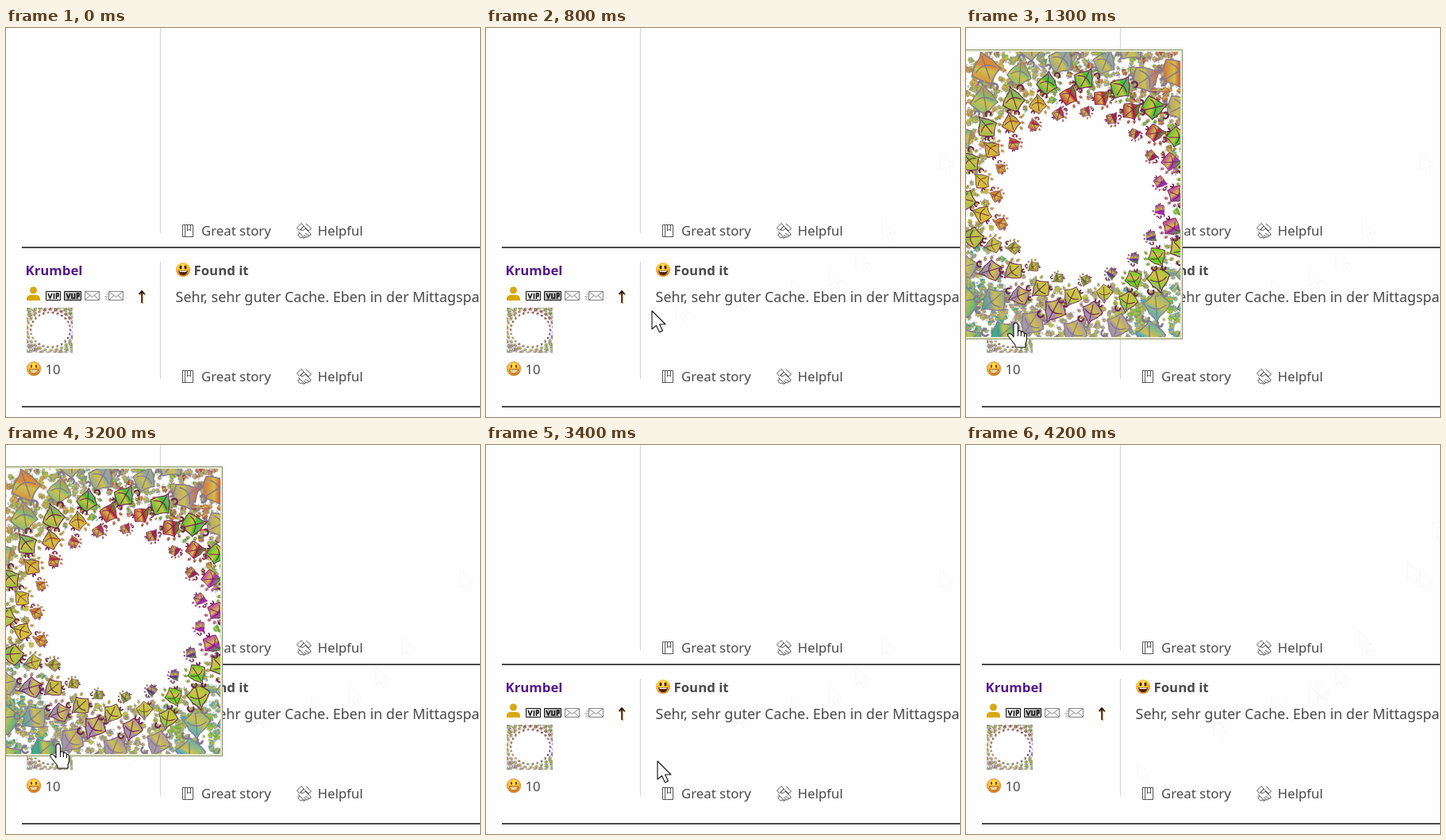
Animation, 597 px wide and 491 px high, one loop 7400 ms. Source, as an HTML page with a canvas:

```html
<!DOCTYPE html>
<html lang="de">
<head>
<meta charset="utf-8">
<style>
html, body { margin: 0; width: 100%; height: 100%; overflow: hidden; background: #fefefe; }
svg, canvas { position: absolute; left: 0; top: 0; }
text { font: 16.8px "Noto Sans", sans-serif; fill: #4a4a4a; }
.bold { font-weight: 700; }
.thin { fill: none; stroke: #555; stroke-width: 1; }
#thumb { left: 26px; top: 353px; filter: saturate(.65); }
#popup { left: -3px; top: 27px; border: 1px solid #8c9468; padding: 2px; background: #e6ead0; }
#ghosts path { fill: none; stroke: #f7f7f7; }
#cursor { fill: #fff; stroke: #111; stroke-width: 1.1; stroke-linejoin: round; }
</style>
</head>
<body>
<svg width="597" height="491">
  <defs>
    <radialGradient id="gold" cx=".45" cy=".3" r=".75">
      <stop offset="0" stop-color="#ffe65a"/><stop offset=".6" stop-color="#f9b52a"/><stop offset="1" stop-color="#c96a10"/>
    </radialGradient>
    <g id="smiley">
      <circle r="9" fill="url(#gold)"/>
      <ellipse cx="-3" cy="-3" rx="1.5" ry="2.5" fill="#38220c"/>
      <ellipse cx="3" cy="-3" rx="1.5" ry="2.5" fill="#38220c"/>
      <path d="M-6 1H6Q5 7 0 7T-6 1Z" fill="#4b1c0c"/>
      <path d="M-5 1.5H5L4 3H-4Z" fill="#fff"/>
    </g>
    <g id="grin">
      <circle r="8.700" fill="url(#gold)" stroke="#b8741c" stroke-width=".6"/>
      <ellipse cx="-3" cy="-3" rx="1.2" ry="2" fill="#7a4312"/>
      <ellipse cx="3" cy="-3" rx="1.2" ry="2" fill="#7a4312"/>
      <path d="M-5.500 1H5.500Q5 6 0 6T-5.500 1Z" fill="#fff3d0" stroke="#9a4f14"/>
      <path d="M-5 3.300H5" stroke="#c98a45" stroke-width=".7"/>
    </g>
    <g id="actions">
      <path class="thin" d="M222.500 -13.500H235.500V1.500H222.500ZM225.500 -13V1M228.500 -13V-6L230.500 -8L232.500 -6V-13"/>
      <path class="thin" d="M366.500 -10L372 -15.500L375 -12L369.500 -6.500ZM378 -15L384.500 -9L381 -6L375 -12M375 -12L371 -7Q374 -5 377 -9L384 -2Q384 1 381 0Q381 3 378 1.500Q376 4 374 1L368 -5M370 -3Q366 -1 369 1Q370 4 373 2Q375 5 377 2M377 -3L381 0M375 -1L378 1.500"/>
      <text x="246">Great story</text>
      <text x="392.500">Helpful</text>
    </g>
    <g id="letter" fill="#f4f4f4" stroke="#888">
      <path d="M.5 .5H18.500V11.500H.5Z"/>
      <path d="M.5 .5L9.500 7.500L18.500 .5M.5 11.500L7 5.500M18.500 11.500L12 5.500" fill="none"/>
    </g>
  </defs>

  <g id="ghosts"></g>
  <path d="M194.500 0V259M194.500 295V443" stroke="#d3d3d3"/>
  <path d="M20 277H597M20 478H597" stroke="#4a4a4a" stroke-width="2"/>
  <use href="#actions" y="262"/>
  <use href="#actions" y="446"/>

  <text class="bold" x="24.500" y="312" style="fill:#551a8b">Krumbel</text>
  <use href="#smiley" x="223" y="305"/>
  <text class="bold" x="236.500" y="312">Found it</text>
  <text x="213.600" y="346" style="font-size:17.920px">Sehr, sehr guter Cache. Eben in der Mittagspause</text>
  <use href="#grin" x="35" y="430"/>
  <text x="49.500" y="437">10</text>

  <g fill="#d9a80f"><circle cx="34.500" cy="331" r="4.500"/><path d="M26 344V341Q27 337 31 337H38Q42 337 43 341V344Z"/></g>
  <g stroke="#111" fill="none">
    <path d="M50.500 332.500H68.500V343.500H50.500Z" fill="#eee"/>
    <path d="M73.500 332.500H94.500V343.500H73.500Z" fill="#bbb"/>
    <path stroke-width="1.500" d="M53 335L55.500 341L58 335M60.500 335V342M63.500 342V335H66V338.500H63.500M76 335L78.500 341L81 335M83 335V341H86.500V335M89.500 342V335H92V338.500H89.500"/>
  </g>
  <use href="#letter" x="99" y="332"/>
  <use href="#letter" x="129" y="332"/>
  <path d="M126 336H131M124 339H130M125 342H130" stroke="#999"/>
  <path d="M172 348V333M168.500 337L172 333L175.500 337" fill="none" stroke="#e58a35" stroke-width="1.500"/>
  <path d="M171 347V332M167.500 336L171 332L174.500 336" fill="none" stroke="#111" stroke-width="1.500"/>
</svg>
<canvas id="thumb" width="58" height="57"></canvas>
<canvas id="popup" width="270" height="360"></canvas>
<svg width="597" height="491"><path id="cursor"/></svg>

<script>
const $ = id => document.getElementById(id);
const ARROW = "M0 0V23L5.500 18.500L9.500 27L13.500 25L9.500 17H17Z";
const HAND = "M-3 18V3a2.700 2.700 0 0 1 5.400 0V12c0-3 4-3 4 0v1c0-3 4-2 4 1v1c0-2 3-2 3 1V22L12 27V31H-1V28L-9 18C-13 13-7 11-3 18ZM2.400 12V17M6.400 13V17M10.400 15V18";

// Leaf colours per ring, clockwise from the right in eighths of a turn.
const PALETTE = [
  "#a32bb8 #5b2ab0 #56874a #7d8f35 #c5662e #b52b4c #a34a62 #93315c",
  "#c41fc4 #55d31c #b5d62c #b4c33a #d9bd24 #d9a526 #d21c3c #b91a4e",
  "#2bd01c #94d22c #a98fa8 #a48da5 #8fc43a #8cba46 #39c328 #35cc1d",
  "#6fc03c #8fb98a #a894ac #93a0a0 #9da56c #7fbf72 #8fa3a0 #a89a8c",
  "#7fa98c #4fb0c0 #a09a9a #35b08a #a1a080 #d98a3c #a3a896 #d9603c"
].map(row => row.split(" "));

function paintFractal(canvas, cx, cy, rx, ry, size, count, fine) {
  const c = canvas.getContext("2d"), { width, height } = canvas;
  let seed = 7;
  const rand = () => (seed = seed * 16807 % 2147483647) / 2147483647;
  const colourAt = (ring, a) => PALETTE[Math.min(4, ring)][Math.round(a / Math.PI * 4 + 8) % 8];

  function curl(x, y, r) {
    c.beginPath();
    c.arc(x, y, r, -2, 2.6);
    c.stroke();
  }

  // The tip points along -x, towards the middle of the ring.
  function leaf(x, y, s, turn, inner, outer, edge) {
    c.save();
    c.translate(x, y);
    c.rotate(turn);
    c.scale(s, s);
    const fill = c.createLinearGradient(-.9, -.5, .9, .5);
    fill.addColorStop(0, inner);
    fill.addColorStop(.45, "#cfc04a");
    fill.addColorStop(.6, inner);
    fill.addColorStop(1, outer);
    c.fillStyle = fill;
    c.strokeStyle = edge;
    c.lineWidth = .08;
    c.beginPath();
    c.moveTo(-1.1, .1);
    c.quadraticCurveTo(-.7, -.6, -.2, -1);
    c.quadraticCurveTo(.3, -.75, .6, -.4);
    c.quadraticCurveTo(.8, -.1, 1.2, 0);
    c.quadraticCurveTo(.7, .3, .5, .6);
    c.quadraticCurveTo(.2, .7, -.25, 1);
    c.quadraticCurveTo(-.5, .5, -1.1, .1);
    c.fill();
    c.stroke();
    c.beginPath();
    c.moveTo(-.8, .1);
    c.lineTo(.9, 0);
    c.moveTo(-.1, -.7);
    c.quadraticCurveTo(.5, 0, -.1, .7);
    c.stroke();
    c.lineWidth = .16;
    curl(.9, .85, .25);
    curl(-.9, -.6, .16);
    c.restore();
  }

  c.fillStyle = "#fefefe";
  c.fillRect(0, 0, width, height);
  // Fine growth, denser towards the corners
  for (let i = 0; i < fine; i++) {
    const x = rand() * width, y = rand() * height;
    const dx = (x - cx) / rx, dy = (y - cy) / ry, d = Math.hypot(dx, dy);
    if (d < 1.12 || rand() > (d - 1) * 2) continue;
    const a = Math.atan2(dy, dx), ring = 1 + Math.floor(rand() * 4);
    leaf(x, y, size * (.1 + rand() * .18), rand() * 6.3,
      colourAt(ring, a), colourAt(ring + 1, a), rand() < .5 ? "#80708a" : "#8f987a");
  }
  for (let ring = 5; ring >= 0; ring--) {
    const grow = 1 + [0, .19, .38, .61, .88, 1.2][ring];
    for (let i = 0; i < count; i++) {
      const a = ((i + ring * .45) / count) * Math.PI * 2 - Math.PI;
      const x = cx + Math.cos(a) * rx * grow, y = cy + Math.sin(a) * ry * grow;
      const s = size * [.42, .62, .76, .9, 1.05, 1.2][ring] * (.9 + rand() * .2);
      const inner = colourAt(ring, a), outer = colourAt(ring + 1, a);
      const edge = ring > 2 ? "#857a8c" : "#70264f";
      for (let k = 0; k < 5; k++) {
        const b = a + .8 + k * .5;
        leaf(x + Math.cos(b) * s * 1.25, y + Math.sin(b) * s * 1.25, s * .18, b, inner, outer, edge);
      }
      leaf(x, y, s, a + .2 + rand() * .5, inner, outer, edge);
    }
  }
}
paintFractal($("popup"), 142, 182, 104, 107, 18, 19, 1900);
paintFractal($("thumb"), 30, 28, 25, 22, 3.4, 26, 500);

// Start time, x, y of each pointer position
const TRACK = [
  [100, 572, 157], [200, 499, 242], [300, 466, 280], [400, 432, 303],
  [500, 385, 318], [600, 315, 330], [700, 239, 343], [800, 209, 357],
  [900, 153, 372], [1000, 147, 370], [1100, 105, 367], [1200, 75, 369],
  [1300, 63, 372], [3200, 66, 377], [3300, 78, 383], [3400, 216, 399],
  [3500, 312, 345], [3600, 402, 322], [3700, 442, 296], [3800, 495, 234],
  [3900, 556, 147], [4000, 588, 96], [4100, 594, 95], [4200, 700, 95]
];
const isHand = time => time >= 1200 && time < 3400;
const place = (el, x, y) => el.setAttribute("transform", `translate(${x} ${y})`);

const ghosts = TRACK.map(([, x, y]) => {
  const path = document.createElementNS("http://www.w3.org/2000/svg", "path");
  path.setAttribute("d", ARROW);
  place(path, x, y);
  return $("ghosts").appendChild(path);
});

function draw() {
  const t = performance.now() % 7400;
  const current = TRACK.findLastIndex(p => p[0] <= t);
  $("popup").style.display = t >= 1300 && t < 3400 ? "" : "none";
  $("cursor").style.display = current < 0 ? "none" : "";
  if (current >= 0) {
    const [time, x, y] = TRACK[current];
    $("cursor").setAttribute("d", isHand(time) ? HAND : ARROW);
    place($("cursor"), x, y);
  }
  // Faint trails stay until the closing popup wipes its area
  ghosts.forEach((ghost, i) => {
    const [time, x] = TRACK[i];
    const wiped = t >= 3400 && time < 3400 && x < 273;
    ghost.style.display = i < current && !isHand(time) && !wiped ? "" : "none";
  });
  requestAnimationFrame(draw);
}
draw();
</script>
</body>
</html>
```
